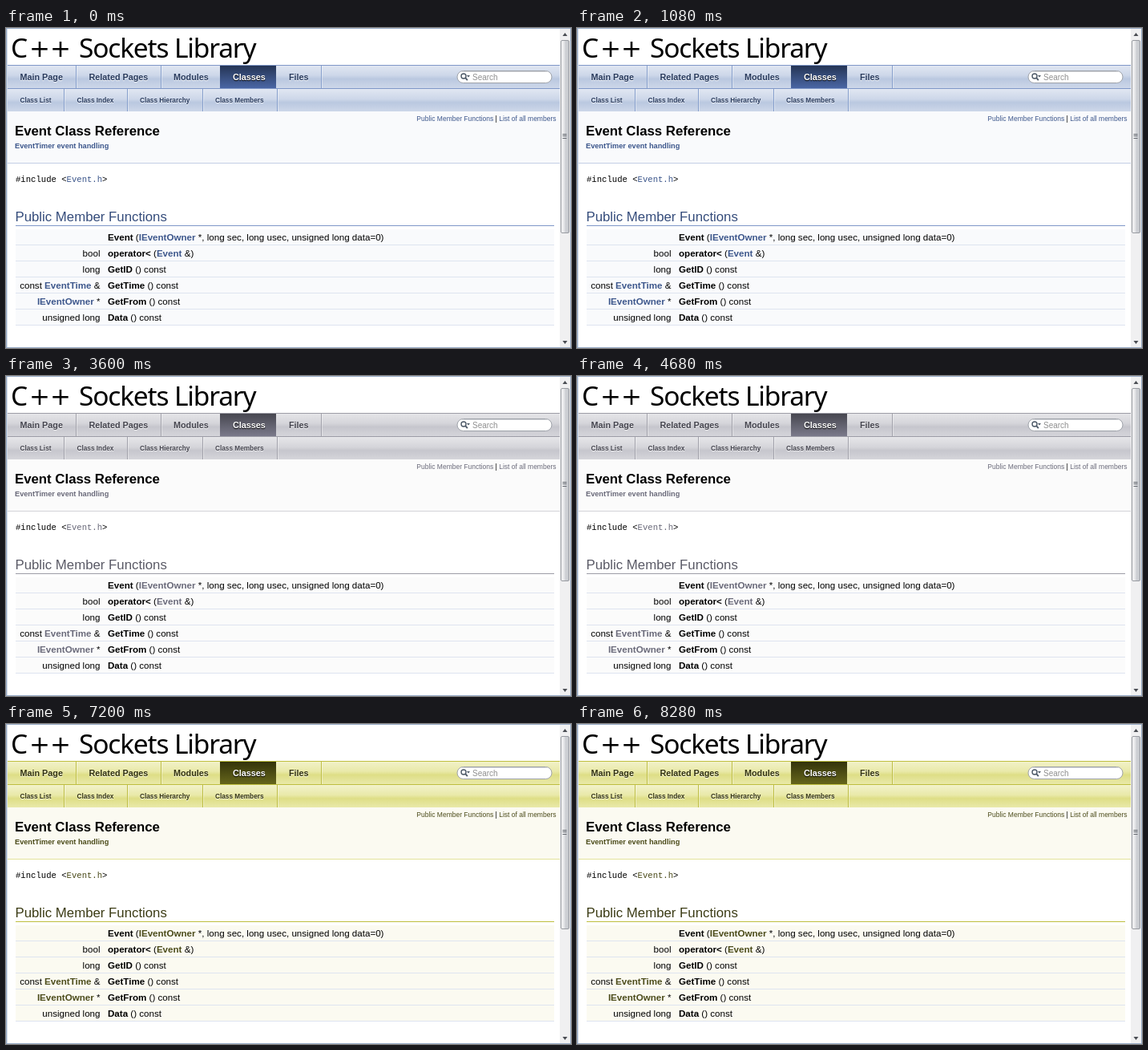
These frames come from a looping animation (705x399 px, 9 s). An HTML page:

```html
<!DOCTYPE html>
<html lang="en">
<head>
<meta charset="utf-8">
<title>Class reference in five colour themes</title>
<style>
html, body { margin: 0; width: 100%; height: 100%; overflow: hidden; background: #fff; }
svg { display: block; width: 705px; height: 399px; animation: theme 9s step-end infinite; }
text { font-family: "Liberation Sans", Arial, sans-serif; fill: #000; }

@keyframes theme {
  0%, 100% {
    --top: #e1e7f2; --mid: #cdd7e9; --low: #bac8e0;
    --line: #7f97c8; --rule: #c4cfe5; --sep: #869fcc; --paper: #f9fafc;
    --link: #3d578c; --head: #354c7b; --tab: #283a5d;
    --on-top: #253555; --on-bottom: #4a66a4;
  }
  20% {
    --top: #dff1df; --mid: #c6e6c6; --low: #aedbae;
    --line: #66bb66; --rule: #b9e0b9; --sep: #6cbc6c; --paper: #f7fbf7;
    --link: #357a35; --head: #2b5f2b; --tab: #1d421d;
    --on-top: #1f4a1f; --on-bottom: #3f8c3f;
  }
  40% {
    --top: #e6e6e9; --mid: #d5d5da; --low: #c6c6cd;
    --line: #9c9ca6; --rule: #d4d4d9; --sep: #a2a2ab; --paper: #fbfbfb;
    --link: #6a6a7a; --head: #5a5a66; --tab: #44444e;
    --on-top: #474750; --on-bottom: #7b7a8b;
  }
  60% {
    --top: #f1dfdf; --mid: #e5c7c7; --low: #dab0b0;
    --line: #bb6b6b; --rule: #dfbcbc; --sep: #be7474; --paper: #fbf8f8;
    --link: #7c3434; --head: #622e2e; --tab: #4a2020;
    --on-top: #4a1f1f; --on-bottom: #8c3f3f;
  }
  80% {
    --top: #f2f2cb; --mid: #e9e9a9; --low: #dede86;
    --line: #bebe3e; --rule: #e3e39c; --sep: #bebe44; --paper: #fbfaf1;
    --link: #4c4c1b; --head: #3c3c15; --tab: #33330f;
    --on-top: #33330a; --on-bottom: #66661c;
  }
}

.s1 { stop-color: var(--top); }
.s2 { stop-color: var(--mid); }
.s3 { stop-color: var(--low); }
.o1 { stop-color: var(--on-top); }
.o2 { stop-color: var(--on-bottom); }

.paper { fill: var(--paper); }
.line { fill: var(--line); }
.rule { fill: var(--rule); }
.sep { stroke: var(--sep); }
.gloss { stroke: #fff; opacity: .4; }
.grid { stroke: #dee4f0; }

.title { font: 33.5px "Noto Sans", "Open Sans", sans-serif; letter-spacing: -1.2px; }
.title .plus { font: 31px "DejaVu Sans", sans-serif; letter-spacing: 0; }
.tabs text { font-weight: bold; fill: var(--tab); text-shadow: 0 1px 1px rgba(255, 255, 255, .9); }
.tabs .on { fill: #fff; text-shadow: 0 1px 1px #000; }
.main { font-size: 10.8px; }
.sub { font-size: 8.25px; }
.members { font-size: 11.6px; }
.types { text-anchor: end; }
.name { font-weight: bold; }
.link { fill: var(--link); }
.el { fill: var(--link); font-weight: bold; }
.head { fill: var(--head); font-size: 16.8px; }
.code { font: 10.6px "Liberation Mono", "Courier New", monospace; }
</style>
</head>
<body>
<svg viewBox="0 0 705 399">
  <defs>
    <linearGradient id="bar" x2="0" y2="1">
      <stop class="s1"/><stop class="s2" offset=".45"/>
      <stop class="s3" offset=".6"/><stop class="s2" offset="1"/>
    </linearGradient>
    <linearGradient id="on" x2="0" y2="1">
      <stop class="o1"/><stop class="o2" offset="1"/>
    </linearGradient>
    <linearGradient id="thumb">
      <stop stop-color="#f4f4f5"/><stop offset=".45" stop-color="#e4e5e7"/>
      <stop offset=".5" stop-color="#d2d4d8"/><stop offset="1" stop-color="#c3c6cb"/>
    </linearGradient>
  </defs>

  <rect width="705" height="399" fill="#fff"/>
  <text class="title" x="6" y="37">C<tspan class="plus" x="29" y="36">++</tspan><tspan x="91" y="37">Sockets</tspan><tspan x="210" y="37">Library</tspan></text>

  <!-- Navigation -->
  <rect x="2" y="46" width="689" height="29" fill="url(#bar)"/>
  <rect x="2" y="76" width="689" height="28" fill="url(#bar)"/>
  <path class="sep" d="M87.5 47v28M193.5 47v28M393.5 47v28M72.5 76v28M151.5 76v28M245.5 76v28M338.5 76v28"/>
  <path class="gloss" d="M88.5 47v28M194.5 47v28M394.5 47v28M73.5 76v28M152.5 76v28M246.5 76v28M339.5 76v28"/>
  <rect x="267" y="47" width="70" height="28" fill="url(#on)"/>
  <rect class="line" x="2" y="46" width="689" height="1"/>
  <rect class="line" x="2" y="75" width="689" height="1"/>
  <g class="tabs main">
    <text x="17.5" y="65">Main Page</text>
    <text x="103.5" y="65">Related Pages</text>
    <text x="209" y="65">Modules</text>
    <text class="on" x="283" y="65">Classes</text>
    <text x="353" y="65">Files</text>
  </g>
  <g class="tabs sub">
    <text x="17.5" y="93">Class List</text>
    <text x="88.5" y="93">Class Index</text>
    <text x="167" y="93">Class Hierarchy</text>
    <text x="261" y="93">Class Members</text>
  </g>

  <!-- Search field -->
  <rect x="563" y="53.5" width="118" height="15" rx="7.5" fill="#fff" stroke="#9da1a8"/>
  <path d="M569 54.5h106" stroke="#d4d6da"/>
  <circle cx="571" cy="60" r="3" fill="none" stroke="#4c5866" stroke-width="1.4"/>
  <path d="M573.2 62.2l2.6 3" stroke="#4c5866" stroke-width="1.8"/>
  <path d="M575 59h4l-2 2.5z" fill="#4c5866"/>
  <text x="582" y="65" style="font-size:10px;fill:#909090">Search</text>

  <!-- Page heading -->
  <rect class="paper" x="2" y="104" width="689" height="64"/>
  <rect class="rule" x="2" y="168" width="689" height="1"/>
  <text x="686.5" y="116" text-anchor="end" font-size="8.5"><tspan class="link">Public Member Functions</tspan> | <tspan class="link">List of all members</tspan></text>
  <text class="name" x="11" y="134" font-size="16.8">Event Class Reference</text>
  <text class="el" x="11" y="150" font-size="9.2">EventTimer event handling</text>

  <text class="code" x="12" y="192">#include &lt;<tspan class="link">Event.h</tspan>&gt;</text>
  <text class="head" x="11.5" y="241">Public Member Functions</text>
  <rect class="line" x="12" y="246" width="672" height="1"/>

  <!-- Member table -->
  <rect class="paper" x="12" y="251" width="672" height="119"/>
  <path class="grid" d="M12 270.5h672M12 290.5h672M12 310.5h672M12 330.5h672M12 350.5h672M12 370.5h672"/>
  <g class="members types">
    <text x="117.5" y="285">bool</text>
    <text x="117.5" y="305">long</text>
    <text x="117.5" y="325">const <tspan class="el">EventTime</tspan> &amp;</text>
    <text x="117.5" y="345"><tspan class="el">IEventOwner</tspan> *</text>
    <text x="117.5" y="365">unsigned long</text>
  </g>
  <g class="members">
    <text x="127" y="265"><tspan class="name">Event</tspan> (<tspan class="el">IEventOwner</tspan> *, long sec, long usec, unsigned long data=0)</text>
    <text x="127" y="285"><tspan class="name">operator&lt;</tspan> (<tspan class="el">Event</tspan> &amp;)</text>
    <text x="127" y="305"><tspan class="name">GetID</tspan> () const</text>
    <text x="127" y="325"><tspan class="name">GetTime</tspan> () const</text>
    <text x="127" y="345"><tspan class="name">GetFrom</tspan> () const</text>
    <text x="127" y="365"><tspan class="name">Data</tspan> () const</text>
  </g>

  <!-- Scrollbar and window edge -->
  <rect x="691" y="1" width="13" height="397" fill="#f0f0f1"/>
  <rect x="692.5" y="15.5" width="10" height="240" rx="1.5" fill="url(#thumb)" stroke="#989ba1"/>
  <path d="M694.5 132.5h5M694.5 134.5h5M694.5 137.5h5" stroke="#63676e"/>
  <path d="M694.5 10h6l-3-4zM694.5 390h6l-3 4z" fill="#4a4d53"/>
  <rect x="1" y="1" width="1" height="397" fill="#d3dce8"/>
  <rect x=".5" y=".5" width="704" height="398" fill="none" stroke="#98abc6"/>
</svg>
</body>
</html>
```
